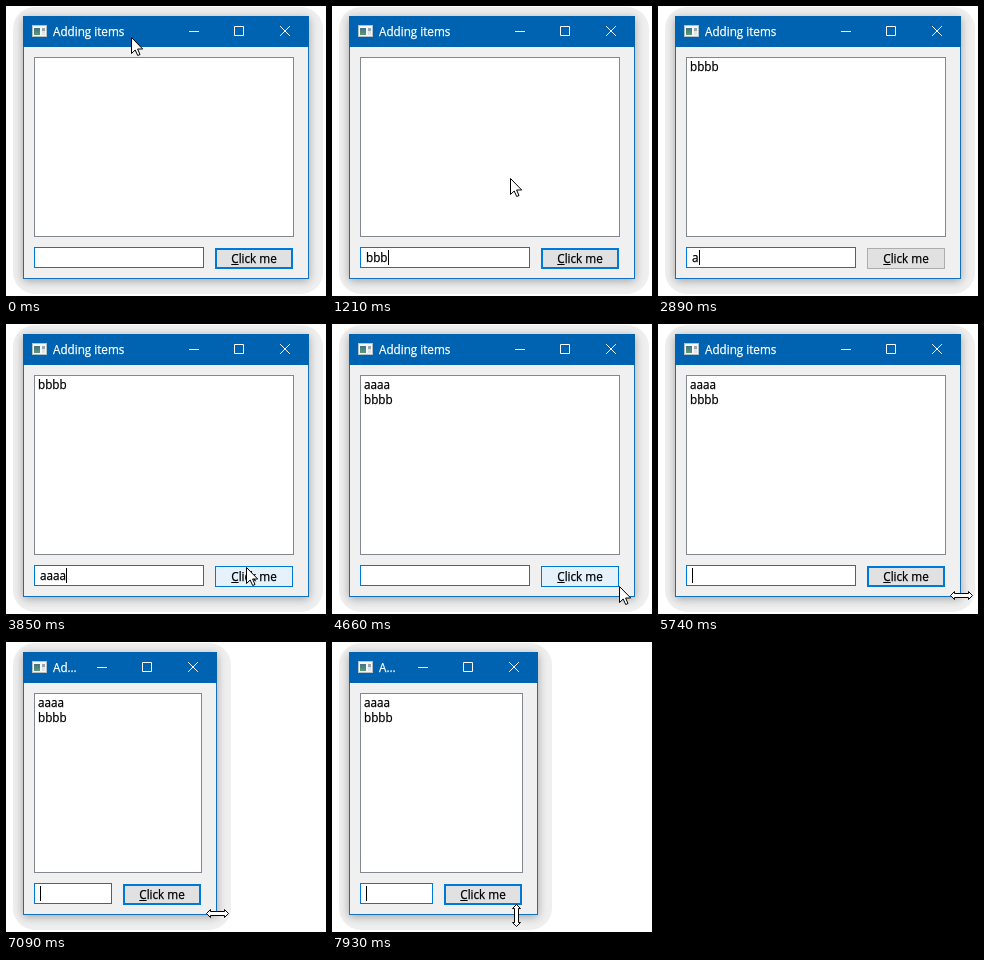
Recreate the animation shown at these times as an HTML page. Size 320 by 290 pixels, loop 8 s.

```html
<!DOCTYPE html>
<html lang="en">
<head>
<meta charset="utf-8">
<title>Adding items</title>
<style>
  html, body { margin: 0; width: 100%; height: 100%; overflow: hidden; background: #fff; }
  #stage {
    --r: 303px;
    position: relative; width: 320px; height: 290px; overflow: hidden;
    font: 11.7px "Open Sans", "Noto Sans", sans-serif; color: #000; white-space: pre;
    -webkit-text-stroke: .25px;
  }
  #stage * { box-sizing: border-box; }
  #stage > * { position: absolute; }
  .halo { left: 7px; top: 1px; width: calc(var(--r) + 7px); height: 287px; border-radius: 22px; background: #efefef; }
  .window {
    left: 17px; top: 10px; width: calc(var(--r) - 17px); height: 263px;
    background: #f0f0f0; border: 1px solid #1370bd; box-shadow: 0 2px 9px rgba(0, 0, 0, .32);
  }
  .bar { left: 17px; top: 10px; width: calc(var(--r) - 17px); height: 31px; background: #0063b1; }
  .icon { left: 26px; top: 19px; width: 15px; height: 12px; background: #f4f6f7; border: 1px solid #b4c0c6; }
  .icon::before {
    content: ""; position: absolute; left: 1px; top: 2px; width: 6px; height: 7px;
    background: linear-gradient(#3f7488, #5b9a72);
  }
  .icon::after {
    content: ""; position: absolute; left: 9px; top: 2px; width: 3px; height: 7px;
    background: linear-gradient(#9aa7ae 50%, #dfe4e7 50%);
  }
  .title {
    left: 47px; top: 11px; width: calc(var(--r) - 185px); line-height: 29px;
    color: #fff; overflow: hidden; text-overflow: ellipsis;
  }
  .controls { left: calc(var(--r) - 125px); top: 20px; fill: none; stroke: #fff; }
  #list {
    left: 28px; top: 51px; width: calc(var(--r) - 43px); height: 180px;
    padding: 1px 3px; line-height: 15px; background: #fff; border: 1px solid #828790;
  }
  #field {
    left: 28px; top: 241px; width: calc(var(--r) - 133px); height: 21px; padding-left: 5px;
    display: flex; align-items: center; line-height: 19px; background: #fff; border: 1px solid #0078d7;
  }
  #field.blur { border-color: #7a7a7a; }
  #caret { width: 1px; height: 15px; background: #000; }
  #button {
    left: calc(var(--r) - 94px); top: 242px; width: 78px; height: 21px;
    line-height: 19px; text-align: center; border: 1px solid #adadad; background: #e1e1e1;
  }
  #button.default { border-color: #0078d7; box-shadow: inset 0 0 0 1px #0078d7; }
  #button.hover { border-color: #0078d7; background: #e5f1fb; }
  #button.press { border-color: #005499; background: #cce4f7; }
  #button u { text-underline-offset: 1px; }
  #mouse { left: 0; top: 0; width: 320px; height: 290px; fill: #fff; stroke: #000; }
</style>
</head>
<body>
<div id="stage">
  <div class="halo"></div>
  <div class="window"></div>
  <div class="bar"></div>
  <div class="icon"></div>
  <div class="title">Adding items</div>
  <svg class="controls" width="108" height="12">
    <path d="M5 5.5H15M50.5 .5h9v9h-9z"/>
    <path d="M96.5 .5l9 9M105.5 .5l-9 9" stroke-linecap="square"/>
  </svg>
  <div id="list"></div>
  <div id="field"><span id="typed"></span><i id="caret"></i></div>
  <div id="button"><u>C</u>lick me</div>
  <svg id="mouse"><path id="pointer"/></svg>
</div>
<script>
  const LOOP = 8000, STEP = 133, BLINK = 350;
  const $ = id => document.getElementById(id);
  const clamp = (v, lo, hi) => Math.min(hi, Math.max(lo, v));

  const arrow = 'M.5 .5V16.5L4.2 13 6.7 18.5 9 17.5 6.6 12H11.7Z';
  const resize = 'M-11 0L-7 -4V-2H7V-4L11 0 7 4V2H-7V4Z';

  // Each word is typed a letter per step, then added by a click
  const words = [
    { text: 'bbbb', type: 930, click: 2030 },
    { text: 'aaaa', type: 2790, click: 3820 }
  ];

  // Pointer moves: start, duration, x, y
  const moves = [
    [150, 660, 178, 172], [1400, 500, 240, 243], [2400, 250, 232, 209], [3430, 260, 240, 243],
    [4100, 555, 287, 262], [4655, 405, 303, 271], [5880, 1169, 211, 271], [7250, 597, 184, 273]
  ];
  const isHidden = t => t > 2650 && t < 3430;

  function pointerAt(t) {
    let [x, y] = [125, 31];
    for (const [start, time, tx, ty] of moves) {
      const p = clamp((t - start) / time, 0, 1);
      x += (tx - x) * p;
      y += (ty - y) * p;
    }
    return [Math.round(x), Math.round(y)];
  }

  // The right window edge is dragged left at constant speed
  const edgeAt = t => Math.round(clamp(303 - (t - 5916) * .0812, 206, 303));

  function drawPointer(t, x, y, edge) {
    const wide = Math.abs(x - edge) < 6;
    const tall = !wide && y > 271;
    const place = `translate(${x} ${y})`;
    $('pointer').setAttribute('d', wide || tall ? resize : arrow);
    $('pointer').setAttribute('transform',
      wide || tall ? `${place} translate(.5 .5) rotate(${tall ? 90 : 0})` : place);
    $('mouse').style.display = isHidden(t) ? 'none' : '';
  }

  function draw(t) {
    const edge = edgeAt(t);
    const [x, y] = pointerAt(t);
    $('stage').style.setProperty('--r', edge + 'px');
    drawPointer(t, x, y, edge);

    const added = w => t >= w.click + STEP;
    const current = words.find(w => t >= w.type && !added(w));
    const pressed = words.some(w => t >= w.click && !added(w));
    const letters = current ? Math.floor((t - current.type) / STEP) + 1 : 0;
    $('typed').textContent = current ? current.text.slice(0, letters) : '';
    $('list').textContent = words.filter(added).map(w => w.text).sort().join('\n');

    const over = x >= edge - 94 && x <= edge - 16 && y >= 242 && y <= 263;
    $('button').className = pressed ? 'press' : isHidden(t) ? 'plain' : over ? 'hover' : 'default';
    $('field').className = pressed ? 'blur' : '';
    const blink = (t + 2 * BLINK - 20) % (2 * BLINK) < BLINK;
    $('caret').style.opacity = !pressed && (current || blink) ? 1 : 0;
  }

  let shown = -1;
  function frame() {
    const t = Math.floor(performance.now() % LOOP / STEP) * STEP;
    if (t !== shown) draw(shown = t);
    requestAnimationFrame(frame);
  }
  frame();
</script>
</body>
</html>
```
